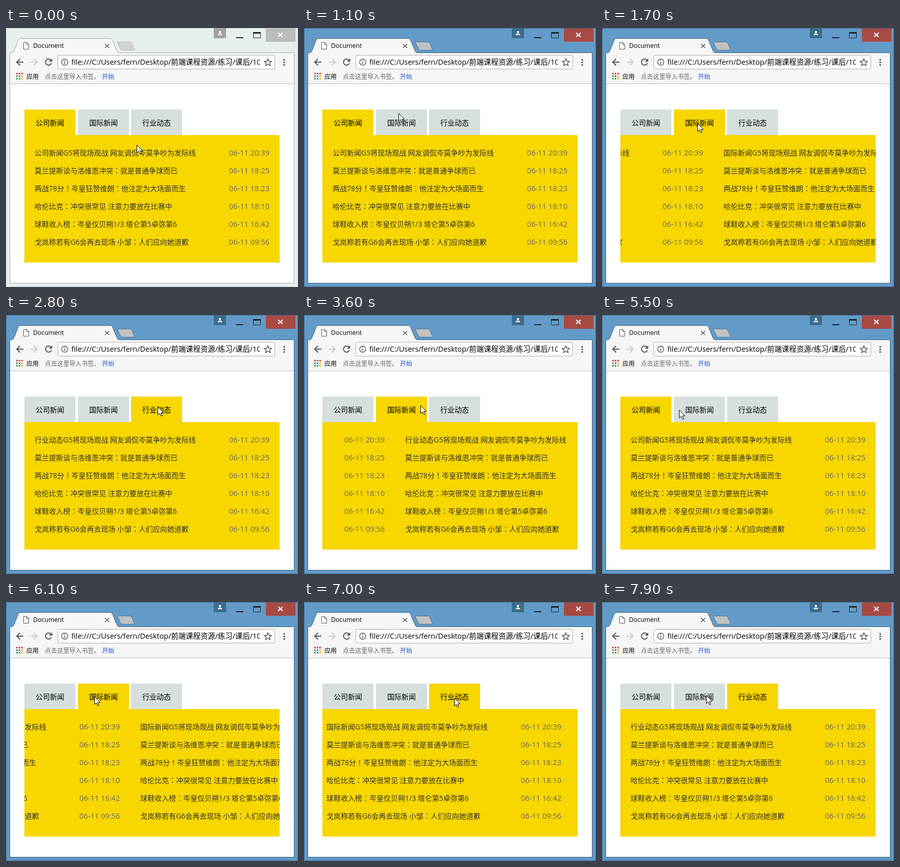
Write an HTML page that moves like this. It is 572 by 508 pixels and loops after 8000 ms.

```html
<!DOCTYPE html>
<html lang="zh-CN">
<head>
<meta charset="utf-8">
<title>Document</title>
<style>
  html, body { margin: 0; width: 100%; height: 100%; overflow: hidden; }
  svg {
    display: block; --on: 0%;
    --frame: color-mix(in srgb, #639bc8 var(--on), #e6efed);
    --rim: color-mix(in srgb, #3a6a8d var(--on), #d0d7d5);
    --edge: color-mix(in srgb, #2f6084 var(--on), #a0a5a4);
    --close: color-mix(in srgb, #a84a44 var(--on), #bcbcbc);
    --user: color-mix(in srgb, #3d6c8d var(--on), #a1a1a1);
    --newTab: color-mix(in srgb, #c0c0c0 var(--on), #d0d3d2);
  }
  text { font: 14px "Open Sans", "Noto Sans CJK SC", "Noto Sans CJK", sans-serif; white-space: pre; }
  .small { font-size: 12px; }
  .caption { font-size: 12.4px; }
  .url { font-size: 14.4px; }
  .title { fill: #333; }
  .mark { font-family: "Noto Sans CJK TC", "Noto Sans CJK SC", sans-serif; }
  .date { fill: #666; font-size: 14.6px; text-anchor: end; }
  .line { fill: none; stroke: #555; stroke-width: 2; }
</style>
</head>
<body>
<svg id="stage" width="572" height="508" viewBox="0 0 572 508">
  <defs>
    <clipPath id="panelClip"><rect x="36" y="210" width="500" height="250"/></clipPath>
    <clipPath id="urlClip"><rect x="126" y="54" width="371" height="26"/></clipPath>
  </defs>

  <!-- window frame and its buttons -->
  <rect x=".5" y=".5" width="571" height="507" fill="var(--frame)" stroke="var(--rim)"/>
  <rect x="407" width="24" height="20" fill="var(--user)"/>
  <circle cx="419" cy="8" r="2.2" fill="#fff"/>
  <path d="M414.5 14q0-3 4.5-3t4.5 3z" fill="#fff"/>
  <path d="M451 19h14" class="line" style="stroke:#222"/>
  <path d="M484.5 9v10.5h14V9" class="line" style="stroke:#222;stroke-width:1"/>
  <path d="M484 9.500h15" class="line" style="stroke:#222;stroke-width:3"/>
  <rect x="509" y="1" width="58" height="26" fill="var(--close)"/>
  <path d="M533 9.500l9 8m0-8l-9 8" class="line" style="stroke:#fff"/>

  <!-- tab strip, toolbar, page -->
  <path d="M7.500 500.500V48.500H11Q14 48.500 15.500 45L24 23.500Q25.500 20.500 28 20.500H204Q207 20.500 208.500 23.500L217.500 45Q219 48.500 222 48.500H564.500V500.500Z" fill="#f5f6f5" stroke="var(--edge)"/>
  <rect x="8" y="110" width="556" height="390" fill="#fff"/>
  <path d="M8 109.500h556" stroke="#bcbebd"/>
  <path d="M219.500 27.500H243Q245.500 27.500 246.500 30L251.500 42Q252 43.500 250.500 43.500H228Q225.500 43.500 224.500 41.500L218.500 29Q218 27.500 219.500 27.500Z" fill="var(--newTab)" stroke="var(--edge)" stroke-opacity=".7"/>
  <path d="M34.500 28.500h6l4 4v9h-10zM40.500 28.500v4h4" fill="#fff" stroke="#555"/>
  <text x="53" y="39" class="caption">Document</text>
  <path d="M194 31.500l8 7.500m0-7.500l-8 7.500" class="line" style="stroke-width:1.6"/>

  <path d="M34 67H21.500M27.500 60.500L21 67l6.500 6.500" class="line"/>
  <path d="M48 67h12.500M54.500 60.500L61 67l-6.500 6.500" class="line" style="stroke:#cbcbcb"/>
  <path d="M88 63A6 6 0 1 0 89 69" class="line"/>
  <path d="M90.500 59.500v6.500h-6.500z" fill="#555"/>
  <rect x="101.500" y="53.500" width="425" height="27" rx="2" fill="#fff" stroke="#a9abaa"/>
  <circle cx="115" cy="67" r="6" class="line" style="stroke-width:1.4"/>
  <path d="M115 66v4.500M115 63v1.600" class="line" style="stroke-width:1.6"/>
  <text x="128" y="72" class="url" clip-path="url(#urlClip)">file:///C:/Users/fern/Desktop/前端课程资源/练习/课后/10</text>
  <path d="M513 60.500l2 4.600 5 .5-3.800 3.300 1.200 4.900-4.400-2.600-4.400 2.600 1.200-4.900-3.800-3.300 5-.5z" class="line" style="stroke-width:1.5"/>
  <path d="M545 61v3m0 2v3m0 2v3" class="line" style="stroke-width:3"/>

  <g id="apps"></g>
  <text x="40" y="100" class="small">应用</text>
  <text x="76" y="100" class="small" fill="#666">点击这里导入书签。</text>
  <text x="188" y="100" class="small" fill="#2257cc">开始</text>

  <g id="tabs"></g>
  <rect x="36" y="210" width="500" height="250" fill="#f8d600"/>
  <g clip-path="url(#panelClip)"><g id="slides"></g></g>

  <path id="cursor" d="M.5 .5V16l3.600-3.300 2.500 5.800 2.500-1.100-2.500-5.500h5z" fill="#fff" stroke="#000"/>
</svg>
<script>
const $ = id => document.getElementById(id);
const LOOP = 8000, TICK = 100, SLIDE_WIDTH = 500;
const SLIDE_MS = 400, SNAP_MS = 320, MOVE_MS = 300;

const tabNames = ['公司新闻', '国际新闻', '行业动态'];
const news = [
  ['G5将现场观战 网友调侃岑莫争吵为发际线', '20:39'],
  ['莫兰提斯谈与洛维恩冲突：就是普通争球而已', '18:25'],
  ['两战78分！岑皇狂赞维朗：他注定为大场面而生', '18:23'],
  ['哈伦比克：冲突很常见 注意力要放在比赛中', '18:10'],
  ['球鞋收入榜：岑皇仅贝朔1/3 塔仑第5卓弥第6', '16:42'],
  ['戈岚称若有G6会再去现场 小邹：人们应向她道歉', '09:56'],
];

const clicks = [
  { at: 1465, tab: 1 }, { at: 2370, tab: 2 }, { at: 3457, tab: 1 },
  { at: 4378, tab: 0 }, { at: 5878, tab: 1 }, { at: 6960, tab: 2 },
];
// places where the cursor comes to rest
const stops = [
  { at: 0, x: 256, y: 229 }, { at: 700, x: 181, y: 126 }, { at: 1200, x: 187, y: 187 },
  { at: 2000, x: 297, y: 180 }, { at: 3200, x: 228, y: 177 }, { at: 4100, x: 107, y: 187 },
  { at: 5600, x: 173, y: 185 }, { at: 6600, x: 294, y: 188 }, { at: 7900, x: 204, y: 183 },
];

const clamp = v => Math.min(1, Math.max(0, v));
const mix = (a, b, p) => a + (b - a) * p;
const swing = p => 0.5 - Math.cos(Math.PI * p) / 2;

const palette = { r: '#e0382c', g: '#2f9e4f', b: '#3b78e7', y: '#f4b400' };
$('apps').innerHTML = [...'rrrgbyggy'].map((key, i) =>
  `<rect x="${20 + i % 3 * 5}" y="${88 + Math.floor(i / 3) * 5}" width="3" height="3" fill="${palette[key]}"/>`).join('');

$('tabs').innerHTML = tabNames.map((name, i) => {
  const x = Math.round(36 + i * 104.6);
  return `<rect x="${x}" y="160" width="100" height="50"/><text x="${x + 22}" y="191">${name}</text>`;
}).join('');
const tabRects = $('tabs').querySelectorAll('rect');

// full-width marks sit in the middle of their cell
const centreMarks = text => text.replace(/[：！]/g, '<tspan class="mark" lang="zh-TW">$&</tspan>');

$('slides').innerHTML = tabNames.map((name, s) => news.map(([title, hour], row) => {
  const x = s * SLIDE_WIDTH, y = 250 + row * 35;
  return `<text x="${x + 56}" y="${y}" class="title">${row ? '' : name}${centreMarks(title)}</text>
    <text x="${x + 516}" y="${y}" class="date">06-11 ${hour}</text>`;
}).join('')).join('');

function cursorAt(t) {
  let { x, y } = stops[0];
  for (const stop of stops.slice(1)) {
    const p = clamp((t - stop.at) / MOVE_MS + 1);
    x = mix(x, stop.x, p);
    y = mix(y, stop.y, p);
  }
  return `${Math.round(x)} ${Math.round(y)}`;
}

function render(t) {
  let active = 0, position = 0;
  for (const { at, tab } of clicks) {
    if (t < at) break;
    const p = t - at >= SNAP_MS ? 1 : swing((t - at) / SLIDE_MS);
    position = mix(active, tab, p);
    active = tab;
  }
  tabRects.forEach((rect, i) => rect.setAttribute('fill', i === active ? '#f8d600' : '#d6dfde'));
  $('slides').setAttribute('transform', `translate(${-Math.round(position * SLIDE_WIDTH)} 0)`);
  $('cursor').setAttribute('transform', `translate(${cursorAt(t)})`);
  $('stage').style.setProperty('--on', clamp((t - 100) / 400) * 100 + '%');
}

function frame() {
  render(Math.floor(performance.now() % LOOP / TICK) * TICK);
  requestAnimationFrame(frame);
}
frame();
</script>
</body>
</html>
```
